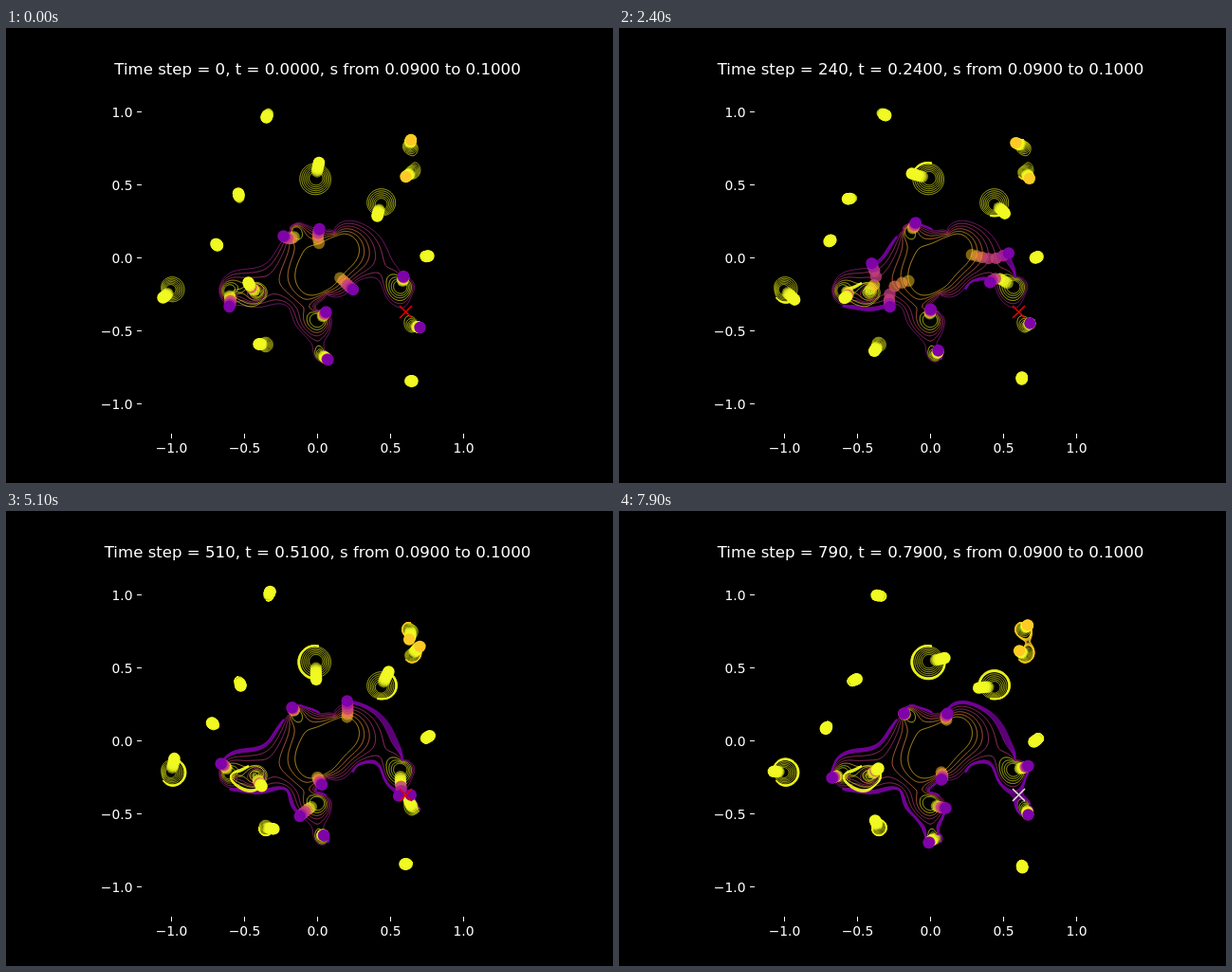
An HTML page with a canvas for the animation above (8 s loop, 640x480 px).

```html
<!DOCTYPE html>
<html lang="en">
<head>
<meta charset="utf-8">
<style>
html, body { margin: 0; width: 100%; height: 100%; overflow: hidden; background: #000; }
canvas { display: block; }
</style>
</head>
<body>
<canvas id="stage" width="640" height="480"></canvas>
<script>
const ctx = document.getElementById('stage').getContext('2d');
const CYCLE_COLORS = ['#f0f921', '#fdca26', '#fb9f3a', '#ee7b51', '#da5b69', '#c33e7f', '#a62098', '#7e03a8'];
const SAMPLES = 400, X0 = 328, Y0 = 242, UNIT = 100;
// Times of the key points, by number of keys per root.
const TIMES = { 2: [0, .51], 3: [0, .31, .61], 5: [0, .18, .39, .61, .79] };

// Complex numbers are [re, im].
const add = (a, b) => [a[0] + b[0], a[1] + b[1]];
const sub = (a, b) => [a[0] - b[0], a[1] - b[1]];
const mul = (a, b) => [a[0] * b[0] - a[1] * b[1], a[0] * b[1] + a[1] * b[0]];
const div = (a, b) => {
  const d = b[0] * b[0] + b[1] * b[1];
  return [(a[0] * b[0] + a[1] * b[1]) / d, (a[1] * b[0] - a[0] * b[1]) / d];
};
const dist = (a, b) => Math.hypot(a[0] - b[0], a[1] - b[1]);
const polar = (r, turn) => [r * Math.cos(turn * 2 * Math.PI), r * Math.sin(turn * 2 * Math.PI)];
const toX = z => X0 + .5 + UNIT * z[0];
const toY = z => Y0 + .5 - UNIT * z[1];

// Monic polynomial with the given roots, highest power first.
function fromRoots(roots) {
  let c = [[1, 0]];
  for (const r of roots) {
    const next = [...c, [0, 0]];
    c.forEach((v, i) => next[i + 1] = sub(next[i + 1], mul(r, v)));
    c = next;
  }
  return c;
}

// Roots of a polynomial whose coefficients are analytic in w = s * exp(2*pi*i*t).
// Each loop lists points along one closed orbit, shared by several roots.
const groups = [];
function addGroup(keyCount, ...loops) {
  const keys = TIMES[keyCount].map(() => []), cycles = [];
  for (const loop of loops) {
    const points = loop.length / 2;
    for (let i = 0; i < points; i++) {
      keys[i % keyCount].push([(loop[2 * i] - X0) / UNIT, (Y0 - loop[2 * i + 1]) / UNIT]);
      if (i % keyCount === 0) cycles.push(points / keyCount);
    }
  }
  groups.push({
    nodes: TIMES[keyCount].map(t => polar(1, t)),
    polys: keys.map(fromRoots),
    start: keys[0],
    colors: cycles.map(n => CYCLE_COLORS[n - 1])
  });
}

// Lagrange interpolation of the coefficients in w.
function coefficients(g, w) {
  const c = g.polys[0].map(() => [0, 0]);
  g.nodes.forEach((node, j) => {
    let weight = [1, 0];
    g.nodes.forEach((other, l) => {
      if (l !== j) weight = mul(weight, div(sub(w, other), sub(node, other)));
    });
    g.polys[j].forEach((v, i) => c[i] = add(c[i], mul(weight, v)));
  });
  return c;
}

// Durand-Kerner steps starting from nearby roots.
function solve(g, w, guess) {
  const c = coefficients(g, w), z = guess.slice();
  for (let pass = 0; pass < 3; pass++) {
    for (let k = 0; k < z.length; k++) {
      let value = c[0], den = [1, 0];
      for (let i = 1; i < c.length; i++) value = add(mul(value, z[k]), c[i]);
      for (let l = 0; l < z.length; l++) if (l !== k) den = mul(den, sub(z[k], z[l]));
      z[k] = sub(z[k], div(value, den));
    }
  }
  return z;
}

function trace(g, r) {
  let z = g.start;
  for (let i = 1; i <= 40; i++) z = solve(g, [1 + (r - 1) * i / 40, 0], z);
  const rows = [z];
  for (let i = 1; i <= SAMPLES; i++) rows.push(z = solve(g, polar(r, i / SAMPLES), z));
  return { rows, colors: r > .905 ? g.colors : cycleColors(rows) };
}

// Colour each root by the length of its cycle after one full turn.
function cycleColors(rows) {
  const first = rows[0];
  const next = rows[SAMPLES].map(z =>
    first.reduce((best, p, j) => dist(p, z) < dist(first[best], z) ? j : best, 0));
  return first.map((_, k) => {
    let len = 1;
    for (let j = next[k]; j !== k && len < 8; j = next[j]) len++;
    return CYCLE_COLORS[len - 1];
  });
}

// Small circles
addGroup(2, [274, 94, 278, 84.5]);
addGroup(2, [244.5, 174, 247, 184]);
addGroup(2, [222.5, 229, 216.5, 223]);
addGroup(2, [428, 372, 420, 372]);
// Rounded loops
addGroup(3, [445, 240, 441, 244.5, 440.5, 234]);
addGroup(3, [165, 284, 189, 279, 167, 263]);
addGroup(3, [266, 333, 272, 342, 280, 328]);
addGroup(3, [391, 198, 410.5, 190, 389.5, 168]);
addGroup(3, [329.5, 141.5, 307.5, 162, 338, 172.5]);
// Two roots on one loop
addGroup(3, [426.5, 117.5, 417, 124.5, 426, 143.5, 421, 156.5, 435, 156, 435, 128]);
// Eight roots on the large outline, one on a loop inside it
addGroup(5, [
  292, 219, 275.5, 241.5, 235, 255, 224, 271.5, 224, 281,
  235, 293.5, 272.5, 297, 298, 303.5, 318, 333, 326, 349.5,
  339, 349.5, 338.5, 340.5, 333, 341, 337, 335, 344, 313,
  337, 299, 330, 296.5, 327, 293, 337, 283.5, 339.5, 283,
  365.5, 275.5, 381.5, 265.5, 398.5, 284, 419.5, 317, 431, 320,
  436, 315.5, 433.5, 311, 433, 308.5, 428, 283.5, 431, 268.5,
  418.5, 261.5, 417, 254, 380.5, 205, 345.5, 208, 346, 213,
  330, 211.5, 315.5, 206, 304.5, 205, 298, 210, 300, 213
], [255, 268, 236, 279, 257, 296, 274, 285, 273, 271]);

const levels = (from, count, gap) =>
  Array.from({ length: count }, (_, i) => groups.map(g => trace(g, from + gap * i)));
const rings = levels(.4, 6, .1);
const band = levels(.91, 10, .01);
const dotLevels = [...rings, band[9]];

function drawCurves(c, level, end) {
  c.lineWidth = .75;
  c.lineJoin = 'round';
  for (const { rows, colors } of level) {
    colors.forEach((color, k) => {
      c.strokeStyle = color;
      c.beginPath();
      for (let i = 0; i <= end; i++) c.lineTo(toX(rows[i][k]), toY(rows[i][k]));
      c.stroke();
    });
  }
}

function drawDots(at) {
  dotLevels.forEach((level, n) => {
    ctx.globalAlpha = .5 + .5 * n / (dotLevels.length - 1);
    for (const { rows, colors } of level) {
      rows[at].forEach((z, k) => {
        ctx.fillStyle = colors[k];
        ctx.beginPath();
        ctx.arc(toX(z), toY(z), 6.2, 0, 7);
        ctx.fill();
      });
    }
  });
  ctx.globalAlpha = 1;
}

function text(c, str, x, y, size, align) {
  c.font = size + 'px "DejaVu Sans", sans-serif';
  c.textAlign = align;
  c.fillStyle = '#fff';
  c.fillText(str, x, y);
}

// Axes and finished rings never change.
function makeBase() {
  const base = document.createElement('canvas');
  base.width = 640;
  base.height = 480;
  const c = base.getContext('2d');
  c.fillRect(0, 0, 640, 480);
  rings.forEach(level => drawCurves(c, level, SAMPLES));
  c.fillStyle = '#fff';
  for (let v = -1; v <= 1; v += .5) {
    const label = v.toFixed(1).replace('-', '\u2212');
    const x = 328.5 + 154 * v, y = 242.5 - 154 * v;
    c.fillRect(x - .5, 428, 1, 5);
    c.fillRect(138, y - .5, 5, 1);
    text(c, label, x, 448, 13.89, 'center');
    text(c, label, 133.5, y + 5, 13.89, 'right');
  }
  return base;
}

function drawCross(color) {
  ctx.strokeStyle = color;
  ctx.lineWidth = 1.6;
  ctx.beginPath();
  for (const d of [-6.5, 6.5]) {
    ctx.moveTo(421.5 - d, 293);
    ctx.lineTo(421.5 + d, 306);
  }
  ctx.stroke();
}

const base = makeBase();

function draw(now) {
  const step = Math.floor(now % 8000 / 100) * 10;
  const at = Math.round(step / 1000 * SAMPLES);
  ctx.drawImage(base, 0, 0);
  if (at) band.forEach(level => drawCurves(ctx, level, at));
  drawDots(at);
  drawCross(step < 530 ? '#e00000' : '#ead8d8');
  text(ctx, `Time step = ${step}, t = ${(step / 1000).toFixed(4)}, s from 0.0900 to 0.1000`, 328.5, 49, 16.62, 'center');
}

const begin = performance.now();
function tick() {
  draw(performance.now() - begin);
  requestAnimationFrame(tick);
}
tick();
</script>
</body>
</html>
```
